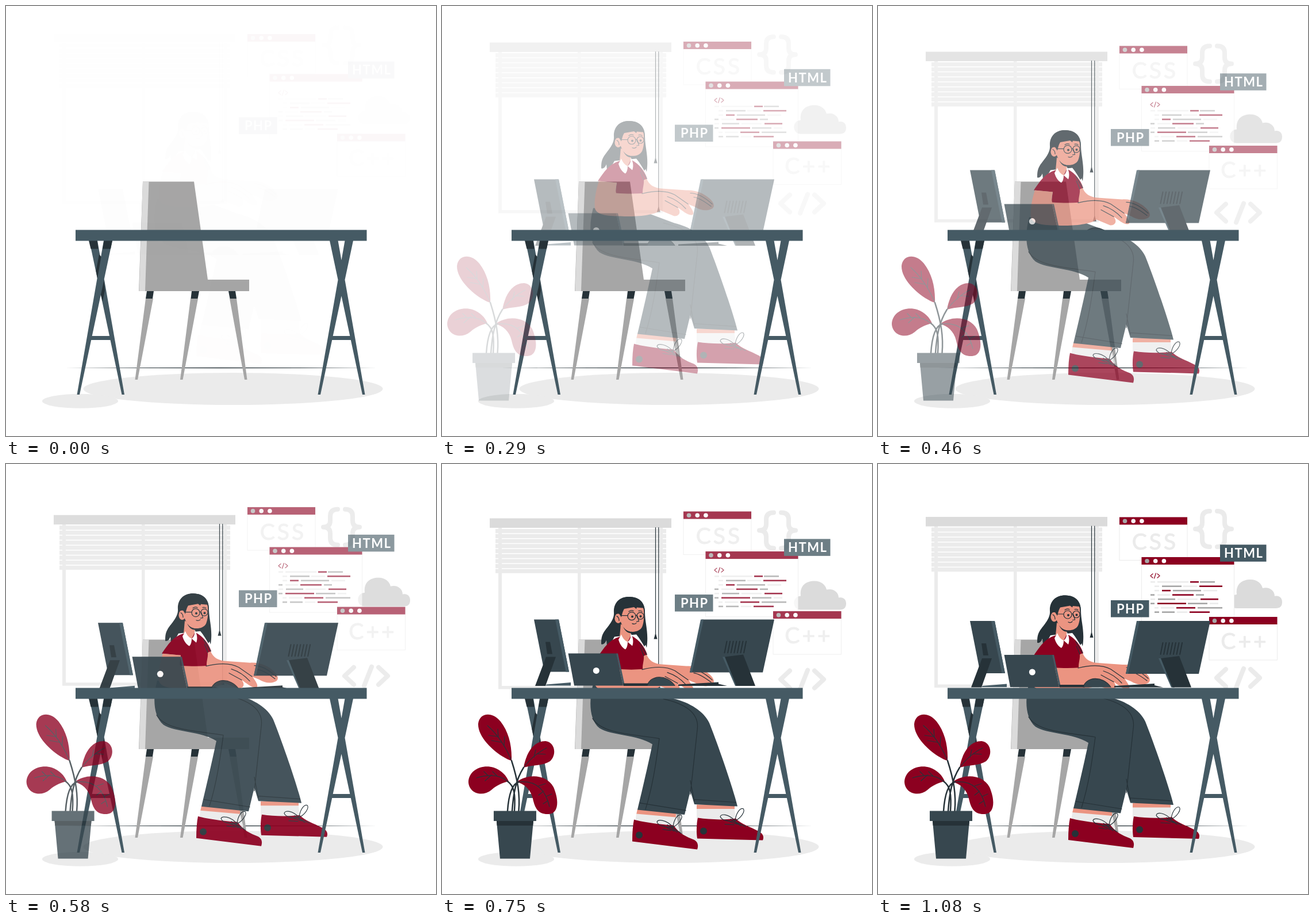
These frames come from a looping animation (748x748 px, 1120 ms). An HTML page:

```html
<!DOCTYPE html>
<html lang="en">
<head>
<meta charset="utf-8">
<title>Programmer at a desk</title>
<style>
html, body { margin: 0; width: 100%; height: 100%; overflow: hidden; background: #fff; }
svg { display: block; width: 100%; height: 100%; }
text { font-family: Lato, sans-serif; text-anchor: middle; }
.line { fill: none; stroke: #263238; stroke-width: 1.2; stroke-linecap: round; stroke-linejoin: round; }
.dark { fill: #263238; }
.slate { fill: #37474f; }
.steel { fill: #455a64; }
.red { fill: #8c0020; }
.skin { fill: #eb9481; }
.pale { fill: #ebebeb; }
.mid { fill: #dbdbdb; }
.grey { fill: #a6a6a6; }
.sign { fill: none; stroke: #ebebeb; stroke-width: 8; stroke-linecap: round; stroke-linejoin: round; }
.big { font-size: 39px; fill: #ebebeb; stroke: #ebebeb; stroke-width: 1; stroke-linejoin: round; letter-spacing: 4px; }
.label { font-size: 22px; font-weight: 700; fill: #fff; letter-spacing: 1.5px; }
</style>
</head>
<body>
<svg viewBox="0 0 748 748">
  <g id="backdrop">
    <g id="blinds" class="pale">
      <path fill-rule="evenodd" d="M98 108H384V389H98ZM104 108V383.500H379V108Z"/>
      <path d="M236 108h5.500v278h-5.500z"/>
    </g>
    <path class="mid" d="M83 92H399V108.500H83Z"/>
    <path class="line" d="M371.500 108V295M376.800 108V382"/>
    <path class="dark" d="M371 293h1l2.500 9h-6zM376.300 378h1l2.500 9h-6z"/>
    <path class="sign" d="M577 82q-13 0-13 12v8q0 11-12 11q12 0 12 11v8q0 12 13 12M590 82q13 0 13 12v8q0 11 12 11q-12 0-12 11v8q0 12-13 12M605 357L589 372l16 15M648 357l16 15-16 15M636 356L623 389"/>
    <path class="mid" d="M624 251C609 251 608 228 624 227C622 208 634 201 648 201C660 201 667 208 669 216C680 213 690 220 690 230C699 228 703 234 703 240Q703 251 692 251Z"/>
  </g>

  <g id="windows"></g>

  <g class="pale">
    <ellipse cx="395" cy="666" rx="260.500" ry="28"/>
    <ellipse cx="129" cy="687.300" rx="66" ry="12.500"/>
  </g>
  <path class="dark" d="M103 629.500L374 628.700 645 629.500 374 630.300Z"/>

  <g id="chair">
    <path class="grey" d="M238 305.500H327L351 476H423V496H231ZM243 509h13L229 650h-4.500zM321 509h13L307.500 650H303zM389 509h12L419.500 650H415z"/>
    <path class="mid" d="M238 305.500H248.500L242 496H231.500Z"/>
    <path class="dark" d="M245 496h12l-2 13h-12zM323 496h13l-2.500 13h-12zM387 496h12l2 13h-11.500z"/>
  </g>

  <g id="woman">
    <path class="skin" d="M340 598L407 605V613L338 607ZM443 590H509V599H443Z"/>
    <path class="pale" d="M338 606L407 612 413 634 335 630ZM443 597.500H509L511 620 443 622Z"/>
    <path class="red" d="M334 616C350 621 385 625 403 626C412 640 425 646 438 651C446 655 446 662 444 668L331 654Q331 630 334 616ZM445 613C465 616 490 617 511 614C520 624 535 628 550 636C560 641 560 647 558 652L444 649C442 635 443 623 445 613Z"/>
    <circle class="dark" cx="343" cy="643" r="6"/>
    <circle class="dark" cx="455" cy="636" r="6"/>
    <path id="laces" class="line" stroke-width="1.700" d="M402 629C403 616 410 606 416 608C420 612 412 624 402 629C390 616 376 615 374 620C376 627 390 630 402 629M386 627l18 9M392 625l17 13M398 628l18 12M384 633l14 2"/>
    <path class="line" d="M510 618C511 606 518 595 524 597C528 602 520 613 510 618C498 606 485 605 484 611C487 618 500 620 510 618M494 617l20 7M502 615l18 12M508 619l20 9M492 624l16 1"/>
    <path class="slate" d="M263 380C255 410 256 442 274 457C294 470 340 468 366 485C362 504 350 558 340 599L422 607.500 432 566 439 589.500 514 593C506 560 478 480 465 448C456 428 430 412 404 406L345 384Z"/>
    <path class="line" d="M262 440C278 468 340 468 378 475C372 520 366 560 354 598M385 406C430 416 448 434 444 460L432 572M432 548L439 584M344 587L424 600M439 581L511 586"/>

    <path class="dark" d="M326 228.500C308 228 298 240 299 256C300 270 286 282 281 291C277 298 277 304 277 311C282 312 284 308 286 304L287 314C293 310 297 304 300 298L338 294C344 301 349 310 352 315L354 312 356 317C360 290 353 275 353 255C353 240 345 229 326 228.500Z"/>
    <path class="skin" d="M350 328L356 329C360 339 368 345 382 346L425 349C442 348 456 355 465 363C472 369 476 377 470 381C460 386 450 384 440 378L420 370 375 364 346 356Z"/>
    <path class="red" d="M309 298C293 303 285 312 271 333L304 336 301 357H350C347 350 352 340 351 331L357 329C352 314 343 304 331 297Z"/>
    <path class="line" d="M344 309L356 329M351 331C349 326 347 320 345 317"/>
    <path class="skin" d="M311 276L329 286 328 297 322 309 309 298Z"/>
    <path class="dark" d="M315 280C321 288 330 291 337 289C328 295 319 291 315 280Z"/>
    <path fill="#fff" d="M307 303L312 294C314 300 318 305 323 307C323 312 322 317 319 320C313 317 309 310 307 303ZM323 307C327 304 329 299 328 292C332 297 334 307 331 314Z"/>
    <ellipse class="skin" cx="306.500" cy="266" rx="6" ry="8.500"/>
    <path class="skin" d="M313 244H350C352 256 352 272 348 281C343 291 325 292 318 284C314 280 311 274 310 268Z"/>
    <path class="dark" d="M300 258C298 239 309 228.500 326 228.500C345 229 353 240 353 256L350 248 339 247 338 249.500 334 246.500 317 249.500C314 254 313 260 312 264L308 258Z"/>
    <path class="line" stroke-width="1" d="M311 261H323M337 261q1.500-1 2.500 0M325 254q4-3 8-1M342 253q4-1 6 1M340 262l2.500 9-4 .5M331 275q4 2 7-1M304 262q4 2 4 8"/>
    <circle class="line" cx="330" cy="262" r="7"/>
    <circle class="line" cx="345" cy="261.500" r="6"/>
    <circle class="dark" cx="331" cy="263" r="2"/>
    <circle class="dark" cx="345.500" cy="262.500" r="2"/>
    <path class="skin" d="M303 354C330 356 350 355 370 352C385 350 395 352 408 358C418 362 428 370 432 378C437 385 440 392 434 392C426 392 418 384 410 379C416 386 414 394 404 394L380 384C370 392 340 396 310 394C288 394 268 392 266 380C264 365 269 345 273 333L304 336C302 345 302 350 303 354Z"/>
    <path class="line" d="M348 355C372 349 392 350 405 357L428 373M392 360C404 364 416 372 424 381M388 367L410 379M432 354C446 354 460 364 470 373M438 361C448 362 460 371 468 377"/>
  </g>

  <g id="devices">
    <path class="slate" d="M452 273H578L558 365H431ZM160 273H203L221 364H178ZM219.500 332H303L315 388H230Z"/>
    <path class="steel" d="M450 273H455L435 365H431ZM197 273H203L221 364H215.500ZM303 332H306L318 388H315ZM182 386L224 382.500V388H180ZM488 338H499L516 388.500H510Z"/>
    <path class="dark" d="M180 312h8l4 21h-9zM181 338H198L180 388.500H162ZM492 338L524 334 545 388.500H512ZM411 388.500V386L481 382V385L496 388.500ZM315 384H360V388.500H316Z"/>
    <path class="slate" d="M357 388.500C362 370 390 367 405 388.500Z"/>
    <path class="line" d="M357 388C362 370 390 367 405 388"/>
    <path id="vents" class="line" style="stroke-width:2"/>
    <circle cx="268.300" cy="362" r="5.500" fill="#fff"/>
  </g>

  <g id="desk">
    <path class="steel" d="M145 408h14L206 676h-4.500zM170 408h15L128 676h-4.500zM563 408h14.500L624.500 676H620zM589.500 408H604L547 676h-4.500zM147 574h36v7h-36zM566 574h36v7h-36z"/>
    <path class="dark" d="M144 408h14.500l2 14.500h-13zM170.500 408h14.500l-3 14.500h-14zM162 432L165.500 436 159 474 156.500 461ZM170.500 477L165 502 168 514 172 495Z"/>
    <path class="steel" d="M121 389.500H627.500V408.500H121Z"/>
  </g>

  <g id="plant">
    <path class="red" d="M121 516C104 512 62 480 63 452C65 432 88 430 102 448C116 466 122 490 121 516ZM142 528C146 505 158 482 180 482C197 484 200 506 188 517C176 525 158 523 142 528ZM116 552C108 554 97 557 86 567C70 580 47 573 46 553C47 532 70 522 90 528C104 533 112 542 116 552ZM130 553C150 538 182 540 194 562C204 585 203 608 186 609C168 610 162 600 158 582C154 565 142 556 130 553Z"/>
    <path class="line" style="stroke-width:2.500" d="M133.500 604C136 575 132 550 121 516M122 604C124 575 128 550 142 528M126 604C128 575 126 560 114 552M114 604C116 575 122 556 134 553"/>
    <path class="line" d="M121 516C110 490 94 468 79 455M142 528C154 512 166 502 182 494M114 552C100 540 80 540 60 546M134 553C164 550 180 566 187 596M98 475l-1-14M108 490l1-16M103 484l-17-3M96 474l-15-2M160 510l3-13M166 504l14 1M96 543l-8-8M86 541l-11 10M80 542l-7-7M168 560l12-4M177 569l-9 7M182 578l9-4M184 586l-8 5"/>
    <path class="slate" d="M90 603.500H164V621H159L153 686.500H101L95 621H90Z"/>
    <path class="dark" d="M95 621H159L158.300 629H95.700Z"/>
  </g>
</svg>
<script>
const $ = id => document.getElementById(id);
const tones = { r: '#8c0020', g: '#a6a6a6', l: '#ebebeb' };

const rect = (x, y, w, h, fill, extra = '') =>
  `<rect x="${x}" y="${y}" width="${w}" height="${h}" fill="${fill}" ${extra}/>`;

function panel(x, y, w, h) {
  const dots = ['#a6a6a6', '#f5f5f5', '#fff'].map((fill, i) =>
    `<circle cx="${x + 9.5 + i * 14.7}" cy="${y + 6.7}" r="3.8" fill="${fill}"/>`);
  return rect(x, y, w, h, '#fff', 'stroke="#ebebeb"') + rect(x, y, w, 13, tones.r) + dots.join('');
}

function label(x, y, w, text) {
  return rect(x, y, w, 29.5, '#455a64') +
    `<text class="label" x="${x + w / 2 + 1}" y="${y + 22.7}">${text}</text>`;
}

// Each bar of code: tone, start, end
const code = [
  'l474-482 l486-540 r543-558 g560-586',
  'l481-489 g494-528 l531-555 r559-599',
  'l481-489 r494-509 g513-562 l566-590',
  'g474-481 l486-508 r512-549 g553-567',
  'l474-482 g487-517 l521-556 r561-592',
  'g474-481 r486-536 g539-573 l577-592',
  'l481-488 l492-515 r519-552 g556-599',
  'g481-489 g494-516 l520-538 r542-577'
].map((row, i) => row.split(' ').map(bar => {
  const [from, to] = bar.slice(1).split('-');
  return rect(from, 203.9 + i * 7.5, to - from, 2.6, tones[bar[0]]);
}).join('')).join('');

$('windows').innerHTML =
  panel(420, 92.5, 118, 75) + '<text class="big" x="482" y="149">CSS</text>' +
  panel(458.5, 162, 161, 113.5) + code +
  '<path class="line" style="stroke:#8c0020" d="M478 191l-4 3.500 4 3.500M486 191l4 3.500-4 3.500M483.500 190l-3 9"/>' +
  panel(576, 266, 118.5, 75) + '<text class="big" x="638" y="322">C++</text>' +
  label(595, 140.3, 80.5, 'HTML') + label(405, 237, 66.5, 'PHP');

for (let i = 0; i < 9; i++)
  $('blinds').innerHTML += rect(93, 110.5 + i * 8.7, 297, 7.2, '#ebebeb');

$('vents').setAttribute('d',
  Array.from({ length: 7 }, (_, i) => `M${495.5 + i * 5.6} 311l-4 20`).join(''));

// Cubic Bezier easing (.36, -.01, .5, 1.38) with a slight overshoot
function overshoot(x) {
  if (x <= 0) return 0;
  if (x >= 1) return 1;
  const curve = (s, a, b) => 3 * (1 - s) ** 2 * s * a + 3 * (1 - s) * s * s * b + s ** 3;
  let low = 0, high = 1;
  for (let i = 0; i < 24; i++) {
    const s = (low + high) / 2;
    if (curve(s, .36, .5) < x) low = s; else high = s;
  }
  return curve(low, -.01, 1.38);
}

function slide(id, progress, dx, dy) {
  const rest = 44.9 * (1 - progress);
  $(id).setAttribute('transform', `translate(${dx * rest} ${dy * rest})`);
  $(id).setAttribute('opacity', Math.max(0, Math.min(1, progress)));
}

function draw(now) {
  // 24 steps per second
  const step = Math.floor((now % 1120 + 4) * .024);
  const time = (step + .7) / 24;
  const eased = overshoot(time);
  slide('backdrop', eased, 0, -1);
  slide('woman', eased, 0, -1);
  slide('devices', eased, 0, 1);
  slide('windows', Math.min(1, time), 0, -1);
  slide('plant', overshoot(time - .1), -1, 0);
}

let start;
function tick(now) {
  start ??= now;
  draw(now - start);
  requestAnimationFrame(tick);
}
draw(0);
requestAnimationFrame(tick);
</script>
</body>
</html>
```
